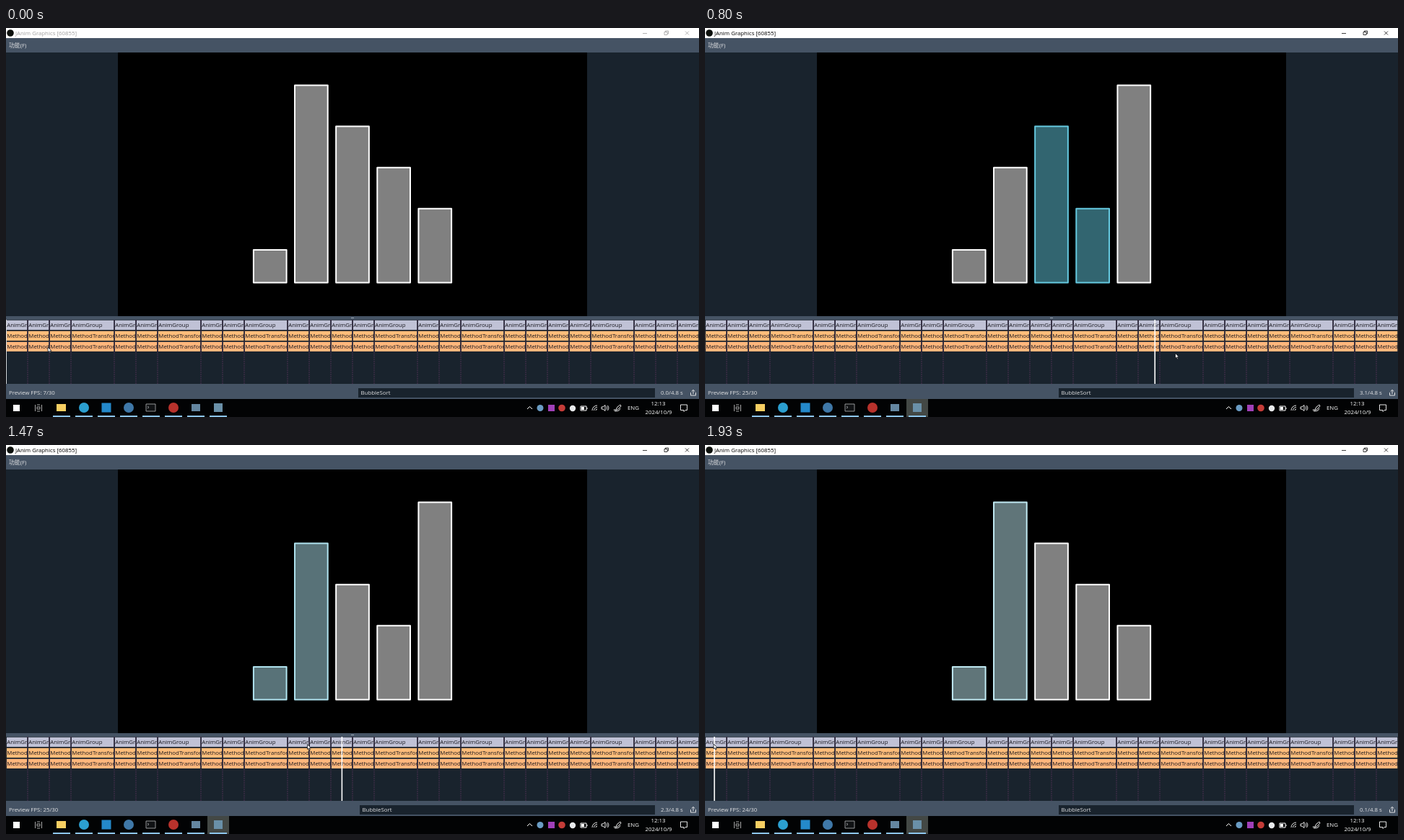
Animation, 960 px wide and 540 px high, one loop 1990 ms. Source, as an HTML page:

```html
<!DOCTYPE html>
<html lang="en">
<head>
<meta charset="utf-8">
<title>Bubble sort preview</title>
<style>
html, body { margin: 0; width: 100%; height: 100%; overflow: hidden; background: #000; }
svg { display: block; width: 960px; height: 540px; }
text { font: 7.85px "Open Sans", "Noto Sans", "Noto Sans CJK SC", "Noto Sans CJK", sans-serif; white-space: pre; }
</style>
</head>
<body>
<svg id="stage" viewBox="0 0 960 540" xmlns="http://www.w3.org/2000/svg"></svg>
<script>
const NS = 'http://www.w3.org/2000/svg';
const stage = document.getElementById('stage');
const LOOP = 1990, STEP = 1000 / 15;
const UNIT = 45.7, PITCH = 57.13, LEFT = 342.9, BASE = 353.6;
const START = [1, 5, 4, 3, 2];
const PANEL = '#455364', DARK = '#19232d', LIGHT = '#e0e1e3', WHITE = '#fff';
const IDLE = [255, 255, 255], LIT = [88, 196, 221];

function set(el, attrs) {
  for (const key in attrs) el.setAttribute(key, attrs[key]);
}
function add(tag, attrs, parent = stage) {
  const el = document.createElementNS(NS, tag);
  set(el, attrs);
  parent.appendChild(el);
  return el;
}
const rect = (x, y, width, height, fill, parent) => add('rect', { x, y, width, height, fill }, parent);
const dot = (cx, cy, r, fill) => add('circle', { cx, cy, r, fill });
const line = (d, stroke, width = 1, extra = {}) =>
  add('path', { d, stroke, fill: 'none', 'stroke-width': width, ...extra });
function label(x, y, content, fill = LIGHT, parent = stage, extra = {}) {
  const el = add('text', { x, y, fill, ...extra }, parent);
  el.textContent = content;
  return el;
}

// Steps of the sort, in timeline pixels (200 px per second).
function buildSteps() {
  const order = [...START], steps = [];
  let x = 0;
  const push = (kind, i, length) => {
    steps.push({ kind, i, x, length, order: [...order] });
    x += length;
  };
  for (let end = order.length - 1; end > 0; end--) {
    for (let i = 0; i < end; i++) {
      push('on', i, 30);
      if (order[i] > order[i + 1]) {
        push('swap', i, 60);
        [order[i], order[i + 1]] = [order[i + 1], order[i]];
      }
      push('off', i, 30);
    }
  }
  return steps;
}
const steps = buildSteps();

const smooth = t => t * t * t * (10 - 15 * t + 6 * t * t);
const tint = t => `rgb(${IDLE.map((v, i) => Math.round(v + (LIT[i] - v) * t))})`;

// Keys are [step, value, slope].
function follow(keys, k) {
  let i = 0;
  while (i < keys.length - 2 && k >= keys[i + 1][0]) i++;
  const [k0, a, va] = keys[i], [k1, b, vb] = keys[i + 1];
  const span = k1 - k0, t = Math.max(0, (k - k0) / span), u = 1 - t;
  return u * u * (1 + 2 * t) * a + t * t * (3 - 2 * t) * b + t * u * span * (u * va - t * vb);
}
const headKeys = [[3, 40, 2], [5, 46, 18], [9, 353, 75], [15, 826, 30], [19, 746, -80], [24, 300, -65], [29, 13, -15]];
const mouseXKeys = [[0, 58, 0], [5, 69, 25], [9, 389, 72], [15, 836, 20], [19, 699, -94], [24, 272, -56], [29, 12, -5]];
const mouseYKeys = [[0, 443, 0], [5, 445, 2], [9, 463, 0], [15, 434, -4], [19, 423, -2], [24, 413, 0], [29, 415, 0]];

// Window frame
rect(0, 0, 960, 14, WHITE);
dot(6, 7, 4.8, '#0c100c');
const title = label(13, 10, 'JAnim Graphics [60855]');
const controls = line('M882 7.5H888 M912 5.5H916V9.5H912Z M913.5 5.5V4H917.5V8H916 M941 4.5L946 9.5M946 4.5L941 9.5', '#222', 0.8);
rect(0, 14, 960, 20, PANEL);
label(4, 26.5, '功能(F)');
rect(0, 34, 960, 366, DARK);
rect(155, 34, 650, 366, '#000');

// Bars
const bars = START.map(value => {
  const height = UNIT * (1 + (value - 1) * 1.25);
  const el = add('rect', {
    y: BASE - height, width: UNIT, height,
    'fill-opacity': 0.5, 'stroke-width': 2, 'stroke-linejoin': 'round'
  });
  return { value, el };
});

// Timeline
rect(0, 400, 960, 5, PANEL);
rect(478, 402, 4, 1, '#9da9b5');
rect(0, 405, 960, 90, DARK);
const rows = [['AnimGroup', '#c0c2d6'], ['MethodTransform', '#ffbd7a'], ['MethodTransform', '#ffb67c']];
for (const { x, length } of steps) {
  rows.forEach(([name, color], i) => {
    const y = 405.5 + i * 15;
    const cell = add('svg', { x: x + 0.8, y, width: length - 1.6, height: 13.6 });
    rect(0, 0, length, 14, color, cell);
    label(0.5, 9.2, name, '#16161c', cell);
  });
  if (x) line(`M${x} 405V494`, '#4a3050', 1, { 'stroke-dasharray': '2 1' });
}
const head = rect(0, 405, 1.6, 89, WHITE);

// Status bar
rect(0, 494, 960, 21, PANEL);
const fps = label(4, 509, '');
const field = rect(488, 500, 411, 13, DARK);
const fieldText = label(491, 509, 'BubbleSort');
const clock = label(907, 509, '');
line('M948.5 506V510H955.5V506 M952 508V502.5 M949.8 504.5L952 502.3L954.2 504.5', LIGHT, 1);

// Taskbar
rect(0, 515, 960, 25, '#020304');
const activeTask = rect(279, 515, 30, 25, '#434845');
rect(10, 523, 9, 9, WHITE);
line('M40.5 523V532 M43 526H47V529H43Z M43 523H47 M43 532H47 M49.5 523V532', '#d0d0d0', 0.8);
rect(70, 522, 13, 10, '#f7cf62');
dot(108, 527, 7, '#2b9fd0');
rect(132.5, 520.5, 13, 13, '#2489ca');
dot(170, 527, 7, '#3f78a8');
rect(194, 522, 13, 10, '#101214');
line('M194 522H207V532H194Z M196 525L198 526.5L196 528', '#b4b6b8', 0.8);
dot(232, 527, 7, '#b8322c');
rect(257, 522, 12, 10, '#6486a0');
rect(288, 521, 12, 12, '#6a90a8');
for (let i = 0; i < 8; i++) rect(65 + i * 31, 538, 24, 2, '#8cc4ea');

// Tray
line('M722 529L725.5 525.5L729 529', WHITE, 1);
dot(740, 527.5, 4.5, '#6a9cc4');
rect(751, 523, 9, 9, '#a040b8');
dot(770, 527.5, 4.8, '#c43c38');
dot(785, 528, 4.2, '#e8eaec');
line('M796 525H804V531H796Z M805 527V529', WHITE, 1);
rect(797, 526, 4, 4, WHITE);
line('M812 531A7 7 0 0 1 819 524 M814.5 531A4.5 4.5 0 0 1 819 526.5 M817 531A2 2 0 0 1 819 529', WHITE, 0.9);
line('M825 526H827L830 523.5V531.5L827 529H825Z M832 525.5Q833.5 527.5 832 529.5 M833.5 524Q836.5 527.5 833.5 531', WHITE, 0.9);
line('M844 531L847 526L851 523L852 525L848 529Z M843 529Q841.5 532 845 532Q850 532 851 528', WHITE, 0.9);
label(861, 530, 'ENG', WHITE);
label(903.5, 524, '12:13', WHITE, stage, { 'text-anchor': 'middle' });
label(904, 536, '2024/10/9', WHITE, stage, { 'text-anchor': 'middle' });
line('M934.5 523H943.5V530.5H941L939 532.5V530.5H934.5Z', WHITE, 0.9);

const cursor = add('path', {
  d: 'M0 0V7L1.6 5.6L2.8 8.2L3.9 7.7L2.8 5.2H5Z',
  fill: WHITE, stroke: '#101418', 'stroke-width': 0.8
});

function drawBars(x) {
  const step = steps.findLast(s => s.x <= x);
  const t = smooth(Math.min(1, (x - step.x) / step.length));
  const lit = { on: t, swap: 1, off: 1 - t }[step.kind];
  const shift = step.kind === 'swap' ? t * PITCH : 0;
  for (const { value, el } of bars) {
    const slot = step.order.indexOf(value);
    const side = slot - step.i;
    const active = side === 0 || side === 1;
    const offset = active ? (side ? -shift : shift) : 0;
    const color = tint(active ? lit : 0);
    set(el, { x: LEFT + slot * PITCH + offset, fill: color, stroke: color });
  }
}

function draw(time) {
  const k = Math.floor((time % LOOP + 4) / STEP);
  const active = k >= 3;
  const x = active ? follow(headKeys, k) : 0;
  const rate = k < 3 ? 7 : k < 8 ? 1 : k < 12 ? 19 : k < 27 ? 25 : 24;
  const fieldLeft = rate < 10 ? 488 : 490;

  drawBars(x);
  set(head, { x: x - 0.8 });
  set(cursor, { transform: `translate(${follow(mouseXKeys, k)} ${follow(mouseYKeys, k)})` });
  set(title, { fill: active ? '#000' : '#a0a0a0' });
  set(controls, { stroke: active ? '#111' : '#a0a0a0' });
  set(activeTask, { visibility: active ? 'visible' : 'hidden' });
  fps.textContent = `Preview FPS: ${rate}/30`;
  clock.textContent = `${(x / 200).toFixed(1)}/4.8 s`;
  set(field, { x: fieldLeft, width: 899 - fieldLeft });
  set(fieldText, { x: fieldLeft + 3.5 });
}

const begin = performance.now();
function tick() {
  draw(performance.now() - begin);
  requestAnimationFrame(tick);
}
tick();
</script>
</body>
</html>
```
